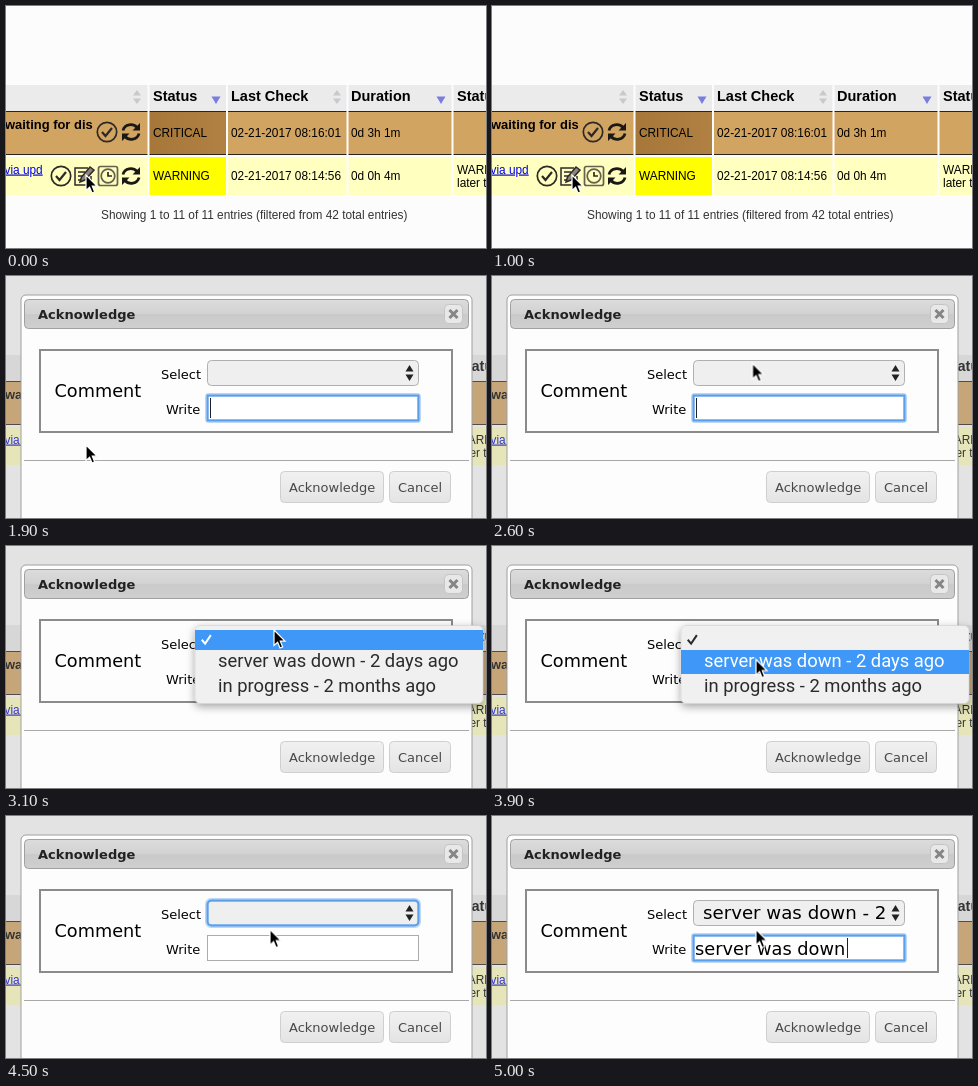
Recreate the animation shown at these times as an HTML page. Size 480 by 242 pixels, loop 5.1 s.

```html
<!DOCTYPE html>
<html lang="en">
<head>
<meta charset="utf-8">
<title>Acknowledge dialog</title>
<style>
html, body { margin: 0; width: 100%; height: 100%; overflow: hidden; background: #fdfcfd; }
svg { display: block; width: 480px; height: 242px; }
text { white-space: pre; }
.page { font: 11.85px "Liberation Sans", Arial, sans-serif; }
.head { font-size: 14.5px; font-weight: bold; }
.ui { font: 13px "DejaVu Sans", Verdana, sans-serif; }
.big { font-size: 17.7px; }
.menu { font: 18.4px Roboto, sans-serif; fill: #2b2b2b; }
.line { fill: none; stroke: #2d2a26; stroke-width: 1.7; }
.ring { fill: none; stroke: #5c9fe9; stroke-width: 2; }
.glow { fill: none; stroke: #8fc0f5; stroke-width: 4; opacity: .6; }

.t { animation: 5.1s step-end infinite; }
.dialog { animation-name: dialog; }
.write { animation-name: write; }
.caret { animation-name: caret; }
.drop { animation-name: drop; }
.picked { animation-name: picked; }
.filled { animation-name: filled; }
.bar { animation-name: bar; }
.first { animation-name: first; }
.second { animation-name: second; }
.mouse { animation: mouse 5.1s ease-in-out infinite; }

@keyframes dialog { 0% { visibility: hidden } 27.45%, 100% { visibility: visible } }
@keyframes write { 0% { opacity: 1 } 56.86% { opacity: 0 } 94.12%, 100% { opacity: 1 } }
@keyframes caret { 0% { opacity: 1 } 39.22% { opacity: 0 } 49.02% { opacity: 1 } 56.86%, 100% { opacity: 0 } }
@keyframes drop { 0% { opacity: 0 } 56.86% { opacity: 1 } 84.31%, 100% { opacity: 0 } }
@keyframes picked { 0% { opacity: 0 } 84.31% { opacity: 1 } 94.12%, 100% { opacity: 0 } }
@keyframes filled { 0% { opacity: 0 } 94.12%, 100% { opacity: 1 } }
@keyframes bar { 0% { y: 84px; height: 20px } 70%, 100% { y: 104px; height: 24px } }
@keyframes first { 0% { fill: #fff } 70%, 100% { fill: #2b2b2b } }
@keyframes second { 0% { fill: #2b2b2b } 70%, 100% { fill: #fff } }
@keyframes mouse {
  0%, 39.22% { transform: translate(80px, 169px) }
  52.94%, 64.7% { transform: translate(268px, 84px) }
  74.5%, 100% { transform: translate(264px, 113.5px) }
}
</style>
</head>
<body>
<svg viewBox="0 0 480 242">
  <defs>
    <linearGradient id="title" x2="0" y2="1">
      <stop offset="0" stop-color="#dcdcdc"/>
      <stop offset=".5" stop-color="#d2d2d2"/>
      <stop offset=".52" stop-color="#cacaca"/>
      <stop offset="1" stop-color="#cfcfcf"/>
    </linearGradient>
    <linearGradient id="button" x2="0" y2="1">
      <stop offset="0" stop-color="#f1f1f1"/>
      <stop offset="1" stop-color="#e4e4e4"/>
    </linearGradient>
    <linearGradient id="critical">
      <stop offset="0" stop-color="#a67738"/>
      <stop offset="1" stop-color="#b08143"/>
    </linearGradient>
    <filter id="shadow" x="-10%" y="-20%" width="120%" height="150%">
      <feDropShadow dx="0" dy="3" stdDeviation="4" flood-opacity=".35"/>
    </filter>
    <g id="check" class="line">
      <circle r="9.7"/>
      <path d="M-5 0l3.5 4 6.5-8" stroke-width="2.2"/>
    </g>
    <g id="refresh" fill="none" stroke="#1b1916" stroke-width="2.8">
      <path d="M-8-1.5C-6.5-8 2-9 6-4.5M8 1.5C6.5 8-2 9-6 4.5"/>
      <path d="M9-9v7.500h-7.500zM-9 9v-7.500h7.500z" fill="#1b1916" stroke="none"/>
    </g>
    <g id="note" class="line">
      <path d="M7 0v9H-9V-8H4M-6-4h7M-6 0h5M-6 4h3" stroke-width="1.5"/>
      <path d="M-4 6l1.500-5L6-9l4 3L1 4z" fill="#8a857d" stroke-width="1.500"/>
    </g>
    <g id="clock" class="line" stroke-width="1.4">
      <rect x="-9.5" y="-9.5" width="19" height="19" rx="2" stroke="#66604f"/>
      <circle r="6.8" stroke="#66604f"/>
      <path d="M0-4V0h4"/>
    </g>
    <path id="sort" d="M-4-1.5L0-7 4-1.5zM-4 1.5L0 7 4 1.5z" fill="#c9c9cc"/>
    <path id="sorted" d="M-4.5-3.5H4.5L0 4z" fill="#7a7de0"/>
  </defs>

  <rect width="480" height="242" fill="#fdfcfd"/>
  <g class="page">
    <rect y="79" width="480" height="26" fill="#ebebec"/>
    <rect y="105" width="480" height="44" fill="#d2a462"/>
    <rect x="143" y="105" width="77" height="44" fill="url(#critical)"/>
    <path d="M0 105.500H480M0 148.500H480" stroke="#2e2415"/>
    <rect y="151" width="480" height="38" fill="#ffffc0"/>
    <rect x="143" y="151" width="77" height="38" fill="#ff0"/>
    <path d="M142.500 79V189M221 79V189M341.500 79V189M446.500 79V189" stroke="#fdfcfd" stroke-width="2"/>

    <g class="head">
      <text x="147" y="95">Status</text>
      <text x="225" y="95">Last Check</text>
      <text x="345" y="95">Duration</text>
      <text x="451" y="95">Status</text>
    </g>
    <use href="#sort" x="131" y="91"/>
    <use href="#sort" x="331" y="91"/>
    <use href="#sorted" x="210" y="94"/>
    <use href="#sorted" x="435" y="94"/>

    <text x="-1" y="123" font-size="12.950" font-weight="bold">waiting for dis</text>
    <text x="147" y="131">CRITICAL</text>
    <text x="225" y="131">02-21-2017 08:16:01</text>
    <text x="345" y="131">0d 3h 1m</text>

    <text x="-1.5" y="167.500" fill="#00e" text-decoration="underline">via upd</text>
    <text x="147" y="174">WARNING</text>
    <text x="225" y="174">02-21-2017 08:14:56</text>
    <text x="345" y="174">0d 0h 4m</text>
    <text x="451" y="167.500">WARNING</text>
    <text x="451" y="180.500">later than</text>
    <text x="95" y="213" fill="#333">Showing 1 to 11 of 11 entries (filtered from 42 total entries)</text>

    <use href="#check" x="101" y="126"/>
    <use href="#refresh" x="125" y="126"/>
    <use href="#check" x="55" y="170"/>
    <use href="#note" x="78" y="170"/>
    <use href="#clock" x="102" y="170"/>
    <use href="#refresh" x="125" y="170"/>
  </g>

  <g class="ui t dialog">
    <rect width="480" height="242" fill="#aaa" opacity=".3"/>
    <rect x="15" y="19" width="451" height="240" rx="5" fill="#fdfdfd" stroke="#a0a0a0"/>
    <rect x="18.5" y="23.5" width="444" height="29" rx="4" fill="url(#title)" stroke="#a0a0a0"/>
    <text x="32" y="43" font-weight="bold" fill="#222">Acknowledge</text>
    <rect x="438.5" y="28.5" width="18" height="19" rx="4" fill="#e8e8e8" stroke="#c4c4c4"/>
    <path d="M443.5 34l8 8m0-8l-8 8" stroke="#858585" stroke-width="3"/>

    <rect x="34" y="74" width="412" height="82" fill="none" stroke="#8b8b8b" stroke-width="2"/>
    <text class="big" x="48.5" y="121">Comment</text>
    <text x="155" y="103">Select</text>
    <text x="160" y="138">Write</text>

    <rect x="201.5" y="84.5" width="211" height="25" rx="4" fill="#efefef" stroke="#b0b0b0"/>
    <path d="M399.5 95.5l4-6.5 4 6.5zM399.5 98.5l4 6.5 4-6.5z" fill="#222"/>
    <rect x="201.5" y="119.5" width="211" height="25" fill="#fff" stroke="#ababab"/>
    <g class="t picked">
      <rect class="glow" x="201" y="84" width="212" height="26" rx="4"/>
      <rect class="ring" x="201.5" y="84.5" width="211" height="25" rx="4"/>
    </g>
    <g class="t write">
      <rect class="glow" x="201" y="119" width="212" height="26" rx="2"/>
      <rect class="ring" x="201.5" y="119.5" width="211" height="25"/>
    </g>
    <path class="t caret" d="M204.5 122v20" stroke="#222"/>
    <g class="t filled">
      <text x="211" y="103" font-size="18.2">server was down - 2</text>
      <text x="203" y="139" font-size="17.8">server was down</text>
      <path d="M355.5 122v20" stroke="#222"/>
    </g>

    <path d="M18 184.5H463" stroke="#a8a8a8"/>
    <g fill="url(#button)" stroke="#cfcfcf">
      <rect x="274.5" y="195.5" width="103" height="31" rx="4"/>
      <rect x="383.5" y="195.5" width="61" height="31" rx="4"/>
    </g>
    <g fill="#484848">
      <text x="283" y="216">Acknowledge</text>
      <text x="392" y="216">Cancel</text>
    </g>

    <g class="menu t drop">
      <rect x="189" y="79.5" width="288" height="78" rx="5" fill="#f0f0f0" stroke="#c8c8c8" stroke-width=".5" filter="url(#shadow)"/>
      <rect class="t bar" x="189" y="84" width="288" height="20" fill="#3f98f8"/>
      <path class="t first" d="M195 94.5l1.5-1.5 2.5 3 5-7.5 1.7 1.2-6.5 9.5z"/>
      <text class="t second" x="212" y="121">server was down - 2 days ago</text>
      <text x="212" y="146">in progress - 2 months ago</text>
    </g>
  </g>

  <path class="mouse" d="M0 0V15.5L3.6 12.2 6 18 8.7 16.9 6.3 11.2H11z" stroke="#fff" stroke-width="1.2"/>
</svg>
</body>
</html>
```
